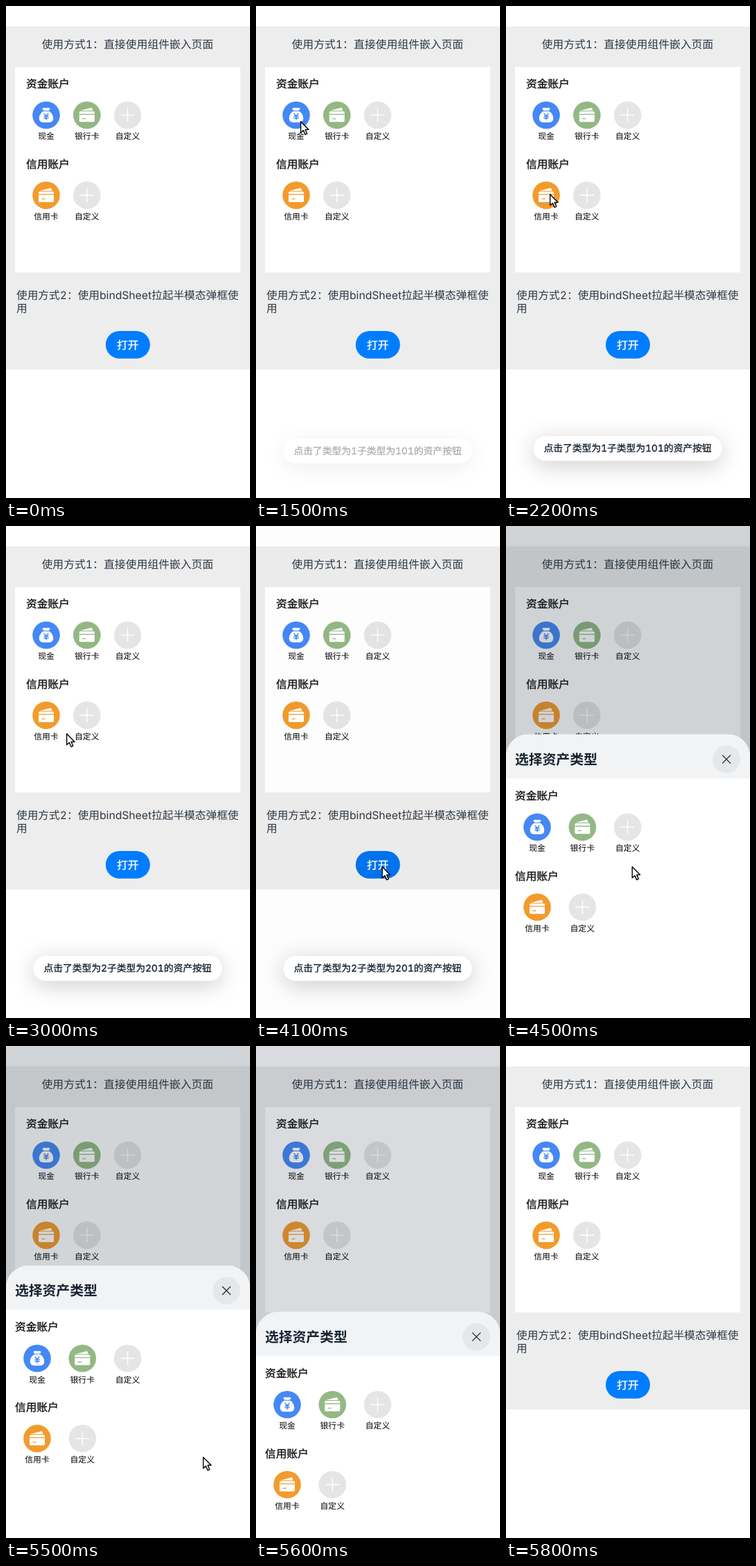
These frames come from a looping animation (352 by 710 pixels, 6300 ms). An HTML page:

```html
<!DOCTYPE html>
<html lang="zh-CN">
<head>
<meta charset="utf-8">
<title>选择资产类型</title>
<style>
html, body { margin: 0; width: 100%; height: 100%; overflow: hidden; background: #fff; }
svg { display: block; width: 352px; height: 710px; overflow: hidden; }
text {
  font-family: Inter, "Noto Sans CJK SC", "Noto Sans CJK", sans-serif;
  font-variant-numeric: tabular-nums;
  text-rendering: geometricPrecision;
}
.medium { stroke: currentColor; stroke-width: .35px; }
.pill { fill: #fff; filter: drop-shadow(0 6px 16px rgba(0, 0, 0, .2)); }
</style>
</head>
<body>
<svg id="stage" viewBox="0 0 352 710"></svg>
<script>
const LOOP = 6300;
const STEP = 100;
const INK = '#182431';
const SOFT_INK = '#2d3843';

// Text placed by the vertical middle of its CJK glyphs.
const label = (str, x, cy, size, { anchor = 'start', weight = 400, fill = INK, style = '' } = {}) =>
  `<text x="${x}" y="${cy + size * .38}" font-size="${size}" font-weight="${weight}"
    text-anchor="${anchor}" fill="${fill}" color="${fill}" class="${style}">${str}</text>`;

// Glyphs are drawn around the centre of their disc.
const moneyBag = color => `
  <path fill="#fff" d="M-5.8 -9.6Q-3 -11.4 0 -10.2Q3 -11.4 5.8 -9.6L3.8 -6.6H-3.8Z
    M-4.2 -5.6H4.2C8 -3.6 10.2 .6 10.2 4.2C10.2 8.4 8 10.4 4 10.4H-4C-8 10.4 -10.2 8.4 -10.2 4.2C-10.2 .6 -8 -3.6 -4.2 -5.6Z"/>
  <path fill="none" stroke="${color}" stroke-width="1.5"
    d="M-3.3 -2.6L0 1.4L3.3 -2.6M0 1.4V7M-3.6 1.8H3.6M-3.6 4.2H3.6"/>`;

const bankCard = color => `
  <path fill="#fff" d="M-9.5 -6.4L5.6 -10.4Q7 -10.7 7.5 -9.4L8.4 -6.4Z"/>
  <rect x="-11" y="-5.4" width="22" height="15.2" rx="1.6" fill="#fff"/>
  <path fill="none" stroke="${color}" stroke-width="1.3" d="M-11 -1.2H11M-6.5 5.2H-1.5"/>`;

const plus = () => `<path stroke="#fff" stroke-width="1.5" d="M-10 0H10M0 -10V10"/>`;

const KINDS = {
  现金: ['#4588f5', moneyBag],
  银行卡: ['#93b884', bankCard],
  信用卡: ['#f29b2d', bankCard],
  自定义: ['#e5e5e5', plus],
};

function account(name, x, y) {
  const [color, glyph] = KINDS[name];
  return `<g transform="translate(${x} ${y})"><circle r="19.8" fill="${color}"/>${glyph(color)}</g>`
    + label(name, x, y + 30.3, 11.8, { anchor: 'middle', fill: '#000' });
}

const section = (title, names, titleX, firstX, gap, y) =>
  label(title, titleX, y, 15.7, { style: 'medium', fill: '#111' })
  + names.map((name, i) => account(name, firstX + i * gap, y + 45.5)).join('');

const accounts = (titleX, firstX, gap, y) =>
  section('资金账户', ['现金', '银行卡', '自定义'], titleX, firstX, gap, y)
  + section('信用账户', ['信用卡', '自定义'], titleX, firstX, gap, y + 115.6);

const toast = (id, str) => `<g id="${id}">
  <rect class="pill" x="39.5" y="620.5" width="272" height="36" rx="18"/>
  ${label(str, 175.5, 638, 13.75, { anchor: 'middle', style: 'medium' })}</g>`;

const $ = id => document.getElementById(id);

$('stage').innerHTML = `
  <rect y="29.5" width="352" height="495" fill="#ededed"/>
  <rect x="13" y="88" width="325" height="296.5" fill="#fff"/>
  ${label('使用方式1：直接使用组件嵌入页面', 51.5, 54.5, 15.84, { fill: SOFT_INK })}
  ${accounts(29, 58, 58.75, 112)}
  ${label('使用方式2：使用bindSheet拉起半模态弹框使', 15, 417, 15.7, { fill: SOFT_INK })}
  ${label('用', 15, 436, 15.7, { fill: SOFT_INK })}
  <rect id="button" x="143.8" y="469" width="64" height="39.8" rx="19.9"/>
  ${label('打开', 175.7, 488.8, 15.7, { anchor: 'middle', style: 'medium', fill: '#fff' })}
  <rect id="mask" width="352" height="710" fill="${INK}"/>
  ${toast('toastCash', '点击了类型为1子类型为101的资产按钮')}
  ${toast('toastCredit', '点击了类型为2子类型为201的资产按钮')}
  <g id="sheet">
    <path fill="#fff" d="M0 32A32 32 0 0 1 32 0H320A32 32 0 0 1 352 32V420H0Z"/>
    <path fill="#f1f3f5" d="M0 32A32 32 0 0 1 32 0H320A32 32 0 0 1 352 32V63.5H0Z"/>
    ${label('选择资产类型', 13, 35.5, 19.8, { weight: 700 })}
    <circle cx="318" cy="36" r="19.8" fill="#e5e8ea"/>
    <path stroke="${INK}" stroke-width="1.3" d="M312 30L324 42M324 30L312 42"/>
    ${accounts(13, 45, 65.25, 88.3)}
  </g>
  <path id="cursor" fill="#fff" stroke="#000" stroke-width="1.4" stroke-linejoin="round"
    d="M.6 .8V16.8L4.3 13.4L7 19.6L9.7 18.4L7.1 12.4H12Z"/>`;

const ramp = (t, from, to) => Math.min(1, Math.max(0, (t - from) / (to - from)));
const linear = p => p;
const easeOut = p => 1 - (1 - p) ** 2;
const smooth = p => p * p * (3 - 2 * p);

// The places the pointer visits, and its legs between them.
const ENTRY = [251, 590], CASH = [64, 166], CREDIT = [63, 271];
const PAST_OPEN = [188, 511], OPEN = [181.5, 491], CLOSE = [316, 338], EXIT = [268, 720];
const LEGS = [
  { start: 100, end: 1000, from: ENTRY, to: CASH, ease: easeOut },
  { start: 1700, end: 2200, from: CASH, to: CREDIT, bend: [44, 218], ease: linear },
  { start: 2900, end: 3500, from: CREDIT, to: PAST_OPEN, bend: [137, 348], ease: linear },
  { start: 3500, end: 3700, from: PAST_OPEN, to: OPEN, ease: linear },
  { start: 4500, end: 5200, from: OPEN, to: CLOSE, ease: smooth },
  { start: 5300, end: 5600, from: CLOSE, to: EXIT, ease: linear },
];

function pointer(t) {
  const { start, end, from, to, bend, ease } = LEGS.findLast(leg => t >= leg.start) ?? LEGS[0];
  const p = ease(ramp(t, start, end));
  return from.map((a, i) => {
    const mid = bend ? bend[i] : (a + to[i]) / 2;
    return (1 - p) ** 2 * a + 2 * p * (1 - p) * mid + p * p * to[i];
  });
}

const place = (id, x, y) => $(id).setAttribute('transform', `translate(${x} ${y})`);

function showToast(id, t, start, end) {
  const shown = ramp(t, start - STEP, start + STEP) ** 1.5 * (1 - ramp(t, end - STEP, end + STEP));
  $(id).style.opacity = shown;
  place(id, 0, 5.4 * (1 - shown));
}

function draw(t) {
  place('cursor', ...pointer(t));
  $('cursor').style.visibility = t >= 200 && t < 5600 ? 'visible' : 'hidden';

  showToast('toastCash', t, 1500, 2500);
  showToast('toastCredit', t, 2600, 4200);

  $('button').setAttribute('fill', t >= 3900 && t < 4200 ? '#0074ee' : '#007dff');

  const closing = ramp(t, 5400, 5800) ** 2.3;
  const hidden = (1 - ramp(t, 4100, 4600)) ** 4 + closing;
  place('sheet', 0, 300 + 412 * hidden);
  $('mask').style.opacity = .2 * smooth(ramp(t, 4050, 4500)) * (1 - closing);
}

const begin = performance.now();
function tick() {
  const t = (performance.now() - begin) % LOOP;
  draw(Math.floor(t / STEP) * STEP);
  requestAnimationFrame(tick);
}
tick();
</script>
</body>
</html>
```
